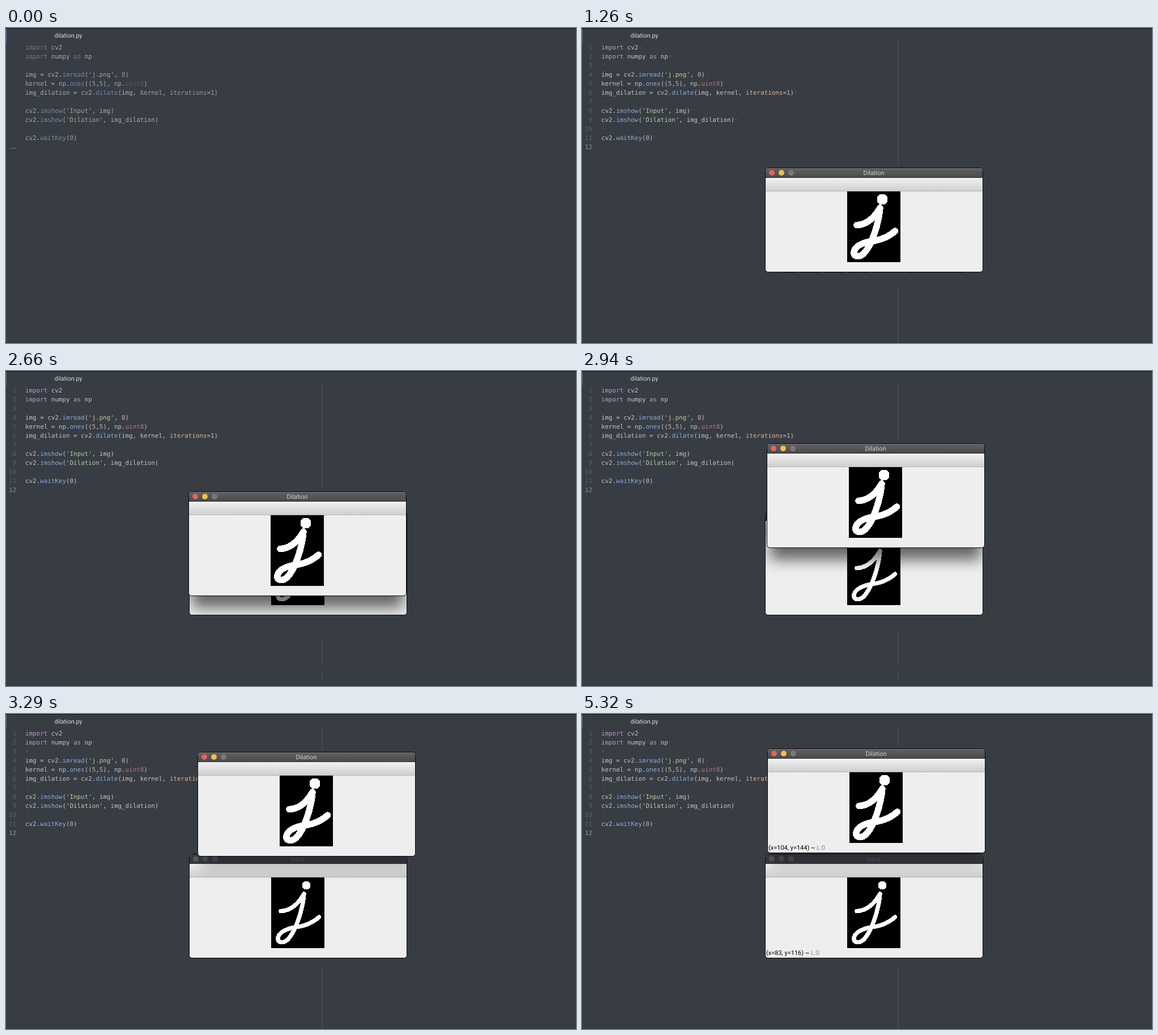
Write an HTML page that moves like this. It is 1006 px wide and 557 px high and loops after 5740 ms.

```html
<!DOCTYPE html>
<html lang="en">
<head>
<meta charset="utf-8">
<title>dilation.py</title>
<style>
html, body { margin: 0; width: 100%; height: 100%; overflow: hidden; background: #383c43; }
svg { display: block; width: 100vw; height: 100vh; }
text { white-space: pre; text-rendering: geometricPrecision; }
.code { font: 10.86px "DejaVu Sans Mono", monospace; fill: #c0c4cc; }
.ui { font: 11px Roboto, sans-serif; }
.p { fill: #c096cb; } .b { fill: #85acda; } .g { fill: #b6ce9c; }
.o { fill: #d9b492; } .r { fill: #b57b7c; }
.dim { fill: #b0b4bb; }
.dim .p { fill: #857a8d; } .dim .r { fill: #675a60; } .dim .o { fill: #ada092; }
.dim .b { fill: #7591b3; } .dim .g { fill: #a4b196; }
.glyph { shape-rendering: crispEdges; fill: none; stroke: #fff; stroke-linecap: round; stroke-linejoin: round; }
</style>
</head>
<body>
<svg id="stage" viewBox="0 0 1006 557" preserveAspectRatio="none">
  <defs>
    <linearGradient id="bar" x2="0" y2="1"><stop stop-color="#616163"/><stop offset="1" stop-color="#49494b"/></linearGradient>
    <linearGradient id="tool" x2="0" y2="1"><stop stop-color="#f2f2f2"/><stop offset="1" stop-color="#cfcfcf"/></linearGradient>
    <filter id="blur" x="-20%" y="-40%" width="140%" height="180%"><feGaussianBlur stdDeviation="13"/></filter>
    <clipPath id="inner"><rect x="324" y="248" width="383" height="183" rx="5"/></clipPath>
  </defs>
  <rect width="1006" height="557" fill="#383c43"/>
  <rect width="1006" height="1" fill="#101318"/>
  <rect y="556" width="1006" height="1" fill="#2f3238"/>
  <rect id="edge" y="2" width="1" height="24"/>
  <text class="ui" x="110" y="17" text-anchor="middle" style="font-size:10.7px" fill="#d9dbdf">dilation.py</text>
  <path id="guide" stroke="#4e5259" fill="none"/>
  <g id="code" class="code"></g>
  <g id="nums" class="code" text-anchor="end"></g>
  <path id="ends" stroke="#52565e" fill="none"/>
  <g id="worn">
    <path id="cuts" stroke="#383c43" stroke-opacity=".55" fill="none"/>
    <path d="M6.5 212.5h5M12.5 212.5h5" stroke="#777b83"/>
  </g>
  <g id="wins"></g>
</svg>
<script>
const LOOP = 5740, STEP = 70, CHAR = 6.538, LEFT = 34;
const $ = id => document.getElementById(id);
const show = (el, on) => el.setAttribute('visibility', on ? 'visible' : 'hidden');
const baseline = i => 38 + 16 * i;

// {class text} marks a coloured token
const lines = [
  '{p import} cv2',
  '{p import} numpy {p as} np',
  '',
  "img = cv2.{b imread}({g 'j.png'}, {o 0})",
  'kernel = np.{b ones}(({o 5},{o 5}), np.{r uint8})',
  'img_dilation = cv2.{b dilate}(img, kernel, {o iterations}={o 1})',
  '',
  "cv2.{b imshow}({g 'Input'}, img)",
  "cv2.{b imshow}({g 'Dilation'}, img_dilation)",
  '',
  'cv2.{b waitKey}({o 0})',
  ''
];
const token = /\{(\w) ([^}]*)\}/g;
let code = '', nums = '', ends = '', cuts = '';
lines.forEach((line, i) => {
  const y = baseline(i), len = line.replace(token, '$2').length;
  code += `<text x="${LEFT}" y="${y}">${line.replace(token, '<tspan class="$1">$2</tspan>')}</text>`;
  nums += `<text x="18" y="${y}" fill="${i === 11 ? '#8d929a' : '#5b6068'}">${i + 1}</text>`;
  if (i < 11) ends += `M${LEFT + 1 + len * CHAR} ${y - 4.5}h5`;
  if (len) cuts += `M${LEFT} ${y - 3.5}h${len * CHAR}`;
});
$('code').innerHTML = code;
$('nums').innerHTML = nums;
$('ends').setAttribute('d', ends);
$('cuts').setAttribute('d', cuts);

function glyph(width, dot) {
  return `<rect x="145" y="42" width="94" height="125" fill="#000"/>
    <g class="glyph" transform="translate(145 42)" stroke-width="${width}">
      <path d="M17 59.5C32 59 46 50 58 29C56 55 44 95 29 110C20 118 9 115 12.5 105C16 95 30 90 45 87.5C61 86 76 78 84.5 70"/>
      <rect x="${62 - dot}" y="${14 - dot}" width="${2 * dot}" height="${2 * dot}" rx="${dot * .75}" fill="#fff" stroke="none"/>
    </g>`;
}

function frame(title, active, status, picture) {
  const lights = active ? ['#e7625a', '#f3bf42', '#79797a'] : ['#595b5f', '#505358', '#505358'];
  const dots = lights.map((c, i) => `<circle cx="${12 + 17 * i}" cy="9" r="5" fill="${c}"/>`).join('');
  return `<rect x=".5" y=".5" width="384" height="184" rx="5" fill="#eee" stroke="#08090b"/>
    <path d="M1 18V5Q1 1 5 1H380Q384 1 384 5V18Z" fill="${active ? 'url(#bar)' : '#383b41'}"/>
    ${active ? '<path d="M5 1.5H380" stroke="#808082"/>' : ''}
    <path d="M1 17.5H384" stroke="#2b2c2f"/>
    <rect x="1" y="18" width="383" height="23" fill="url(#tool)"/>
    <path d="M1 41.5H384" stroke="#b5b5b5"/>
    ${dots}
    <text class="ui" x="192" y="13" text-anchor="middle" fill="${active ? '#cfcfd0' : '#555961'}">${title}</text>
    ${picture}
    <text class="ui status" x="2" y="179">${status} ~ <tspan fill="#8a8a8a">L:0</tspan></text>`;
}

$('wins').innerHTML = `
  <path id="under" d="M357 432.5H677" stroke="#202226" stroke-dasharray="22 5 13 3" fill="none"/>
  <g transform="translate(323 247)">${frame('Input', false, '(x=83, y=116)', glyph(7.5, 7))}</g>
  <g clip-path="url(#inner)"><rect id="shade" width="373" height="185" filter="url(#blur)"/></g>
  <g id="front">${frame('Dilation', true, '(x=104, y=144)', glyph(11.5, 9))}</g>`;
const labels = document.querySelectorAll('.status');

// time, left, top of the dragged window
const drag = [
  [2380, 323, 247], [2520, 323, 239], [2660, 322, 213], [2800, 323, 171], [2940, 326, 128],
  [3115, 332, 89], [3290, 338, 67], [3360, 338, 63], [3500, 332, 61], [3640, 327, 61]
];
function place(t) {
  if (t <= drag[0][0]) return drag[0].slice(1);
  const n = drag.findIndex(k => k[0] > t);
  if (n < 0) return drag[drag.length - 1].slice(1);
  const a = drag[n - 1], b = drag[n], f = (t - a[0]) / (b[0] - a[0]);
  return [1, 2].map(i => Math.round(a[i] + (b[i] - a[i]) * f));
}

function draw(ms) {
  const t = Math.floor(ms / STEP) * STEP;
  const crisp = t >= 840, open = t >= 980;
  const faded = t >= 2450 && t < 3150;
  const [x, y] = place(t);

  $('edge').setAttribute('fill', t < 280 ? '#5878c4' : crisp ? '#6d7178' : '#43474e');
  $('code').setAttribute('class', crisp ? 'code' : 'code dim');
  show($('worn'), !crisp);
  show($('nums'), crisp);
  show($('ends'), crisp && !faded);
  show($('guide'), crisp);

  const low = t < 2450 ? 461 : t < 2800 ? 470 : t < 3150 ? 461 : 445;
  const top = open ? y - 4 : 557;
  const bottom = !open ? '' : faded ? `M557.5 ${low}V523M557.5 536V550` : `M557.5 ${low}V556`;
  $('guide').setAttribute('d', `M557.5 26V${top}${bottom}`);

  $('wins').setAttribute('display', open ? 'inline' : 'none');
  show($('under'), t < 2450);
  $('front').setAttribute('transform', `translate(${x} ${y})`);
  const shade = $('shade');
  shade.setAttribute('x', x + 6);
  shade.setAttribute('y', y + 21);
  shade.setAttribute('opacity', .24 + .34 * Math.min(1, Math.max(0, (y - 67) / 50)));
  labels.forEach(el => show(el, t >= 5110));
}

const start = performance.now();
function tick() {
  draw((performance.now() - start) % LOOP);
  requestAnimationFrame(tick);
}
tick();
</script>
</body>
</html>
```
